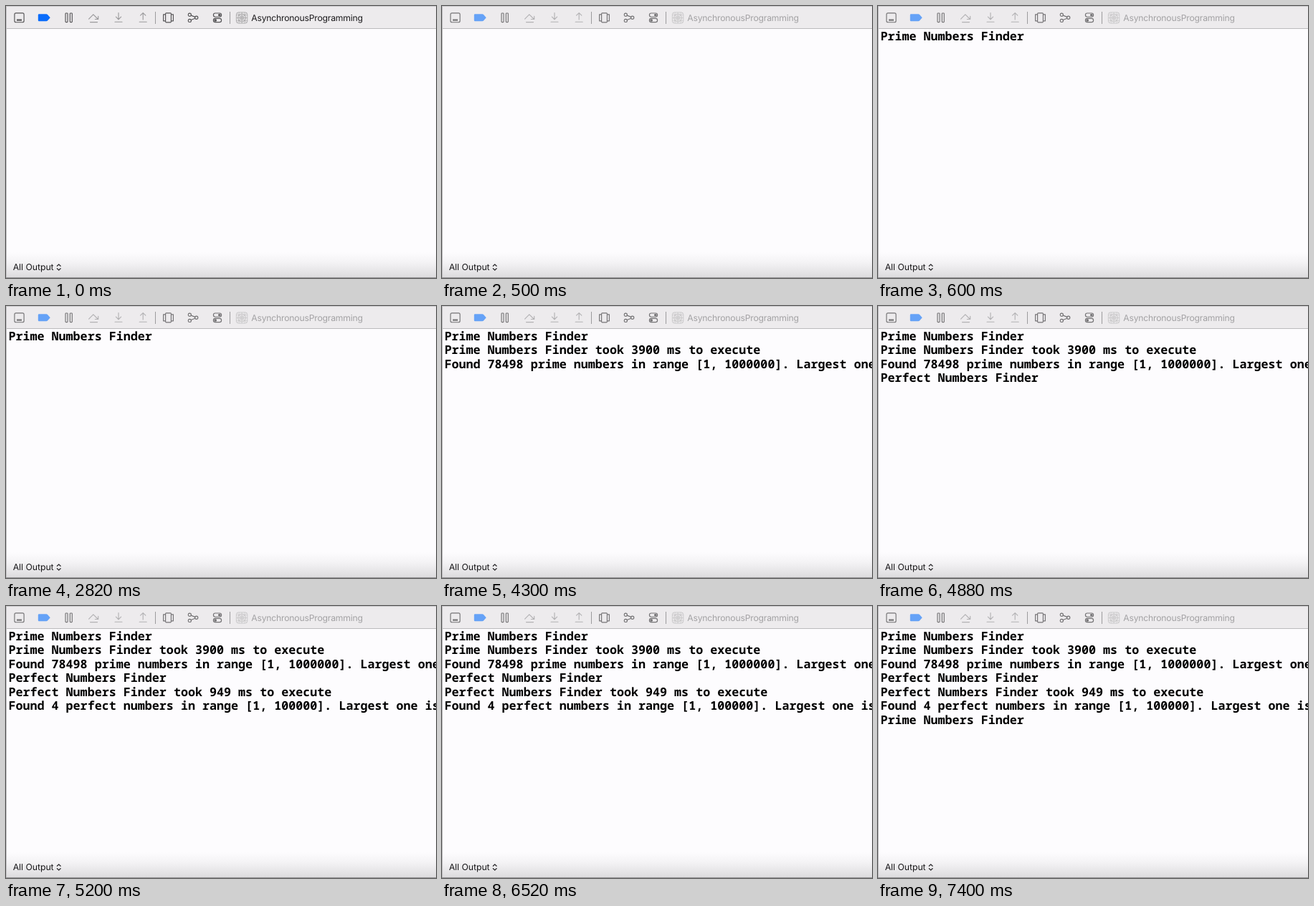
An HTML page for the animation above (8 s loop, 600 by 380 pixels).

```html
<!DOCTYPE html>
<html lang="en">
<head>
<meta charset="utf-8">
<title>Debug console</title>
<style>
  html, body { margin: 0; width: 100%; height: 100%; overflow: hidden; background: #fdfcfe; }
  svg { display: block; width: 600px; height: 380px; text-rendering: geometricPrecision; }

  .ui { font: 400 12.2px Inter, "Open Sans", sans-serif; }
  .console text {
    font: 700 16.72px "Noto Sans Mono", "DejaVu Sans Mono", monospace;
    white-space: pre;
    visibility: hidden;
    animation: 8s step-end infinite;
  }

  .icon { fill: none; stroke-width: 1.15; stroke-linejoin: round; stroke-linecap: round; }
  .on { stroke: #555456; animation: dim-on 8s step-end infinite; }
  .off { stroke: #9b9a9c; animation: dim-off 8s step-end infinite; }
  .tag { fill: #0a6cfb; animation: dim-tag 8s step-end infinite; }
  .title { fill: #1c1b1d; letter-spacing: -.2px; animation: dim-title 8s step-end infinite; }
  .app { fill: none; stroke: #969597; stroke-width: .7; animation: dim-app 8s step-end infinite; }

  /* The toolbar loses focus at 500 ms. */
  @keyframes dim-on { 6.25%, 100% { stroke: #747375; } }
  @keyframes dim-off { 6.25%, 100% { stroke: #b3b2b4; } }
  @keyframes dim-tag { 6.25%, 100% { fill: #65a2f7; } }
  @keyframes dim-title { 6.25%, 100% { fill: #a3a2a4; } }
  @keyframes dim-app { 6.25%, 100% { stroke: #bebdbf; } }

  /* Console output arrives in five batches. */
  .console .prime { animation-name: prime; }
  .console .prime-done { animation-name: prime-done; }
  .console .perfect { animation-name: perfect; }
  .console .perfect-done { animation-name: perfect-done; }
  .console .again { animation-name: again; }
  @keyframes prime { 7.5%, 100% { visibility: visible; } }
  @keyframes prime-done { 53.75%, 100% { visibility: visible; } }
  @keyframes perfect { 55%, 100% { visibility: visible; } }
  @keyframes perfect-done { 65%, 100% { visibility: visible; } }
  @keyframes again { 92.5%, 100% { visibility: visible; } }
</style>
</head>
<body>
<svg viewBox="0 0 600 380">
  <defs>
    <linearGradient id="footer" x2="0" y2="1">
      <stop offset="0" stop-color="#fdfcfe"/>
      <stop offset=".4" stop-color="#f4f3f5"/>
      <stop offset="1" stop-color="#dddcde"/>
    </linearGradient>
  </defs>

  <!-- Window -->
  <rect width="600" height="380" fill="#fdfcfe"/>
  <rect y="344" width="600" height="35" fill="url(#footer)"/>
  <rect width="600" height="32" fill="#edebed"/>
  <rect width="600" height="1" fill="#c9c8ca"/>
  <rect y="31" width="600" height="1" fill="#bbbabc"/>
  <rect width="1" height="380" fill="#c3c2c4"/>
  <rect y="379" width="600" height="1" fill="#929193"/>

  <!-- Toolbar -->
  <path d="M208.5 8V25M312.5 8V25" stroke="#9c9b9d"/>
  <path class="tag" d="M46 11.2H56.2Q57.3 11.2 58 12L61.7 16.2L58 20.4Q57.3 21.2 56.2 21.2H46Q44.8 21.2 44.8 20V12.4Q44.8 11.2 46 11.2Z"/>
  <g class="icon on">
    <rect x="11.9" y="9.9" width="13.2" height="12.8" rx="2"/>
    <path d="M15 19.6H22" stroke-width="2.2" stroke-linecap="butt"/>
    <rect x="83" y="10" width="3" height="12.6" rx=".8"/>
    <rect x="89.3" y="10" width="3" height="12.6" rx=".8"/>
    <rect x="222.6" y="9.8" width="7.8" height="13" rx="1"/>
    <path d="M222 11.8H219.6V20.8H222M231 11.8H233.4V20.8H231"/>
    <circle cx="256.3" cy="12.2" r="2.1"/>
    <circle cx="256.3" cy="20.4" r="2.1"/>
    <circle cx="265.7" cy="16.3" r="2.1"/>
    <path d="M258.3 13.1L263.7 15.4M258.3 19.5L263.7 17.2"/>
    <rect x="289.4" y="10" width="11.2" height="5.2" rx="2.6"/>
    <rect x="289.4" y="17.4" width="11.2" height="5.2" rx="2.6"/>
    <path d="M297.6 12.6H298M292 20H292.4" stroke-width="3.4"/>
  </g>
  <g class="icon off">
    <path d="M115.6 18.2L121.8 11.8L128 18M128.7 14.2V18.5H124.4M117.5 22.6H127.5"/>
    <path d="M157 9.6V18.6M153.4 15.2L157 18.8L160.6 15.2M152 22.2H162"/>
    <path d="M191.2 19V9.8M187.6 13.2L191.2 9.6L194.8 13.2M186.2 22.2H196.2"/>
  </g>
  <g class="app">
    <rect x="321.4" y="8.9" width="15.4" height="15.2" rx="3"/>
    <circle cx="329.1" cy="16.5" r="5.6"/>
    <circle cx="329.1" cy="16.5" r="2.4"/>
    <path d="M321.4 16.5H336.8M329.1 8.9V24.1M325.2 8.9V24.1M333 8.9V24.1M321.4 12.6H336.8M321.4 20.4H336.8M322.3 9.8L335.9 23.2M335.9 9.8L322.3 23.2" stroke-width=".5"/>
  </g>
  <text class="ui title" x="342.2" y="20.7">AsynchronousProgramming</text>

  <!-- Output -->
  <g class="console">
    <text class="prime" x="3.4" y="47.7">Prime Numbers Finder</text>
    <text class="prime-done" x="3.4" y="67.2">Prime Numbers Finder took 3900 ms to execute</text>
    <text class="prime-done" x="3.4" y="86.7">Found 78498 prime numbers in range [1, 1000000]. Largest one</text>
    <text class="perfect" x="3.4" y="106.2">Perfect Numbers Finder</text>
    <text class="perfect-done" x="3.4" y="125.7">Perfect Numbers Finder took 949 ms to execute</text>
    <text class="perfect-done" x="3.4" y="145.2">Found 4 perfect numbers in range [1, 100000]. Largest one is</text>
    <text class="again" x="3.4" y="164.7">Prime Numbers Finder</text>
  </g>

  <!-- Footer -->
  <text class="ui" x="9.7" y="369.4" fill="#161517">All Output</text>
  <path d="M71.3 363.3L73.7 361L76.1 363.3M71.3 366.7L73.7 369L76.1 366.7" fill="none" stroke="#2a292b" stroke-width="1.2" stroke-linecap="round" stroke-linejoin="round"/>
</svg>
</body>
</html>
```
